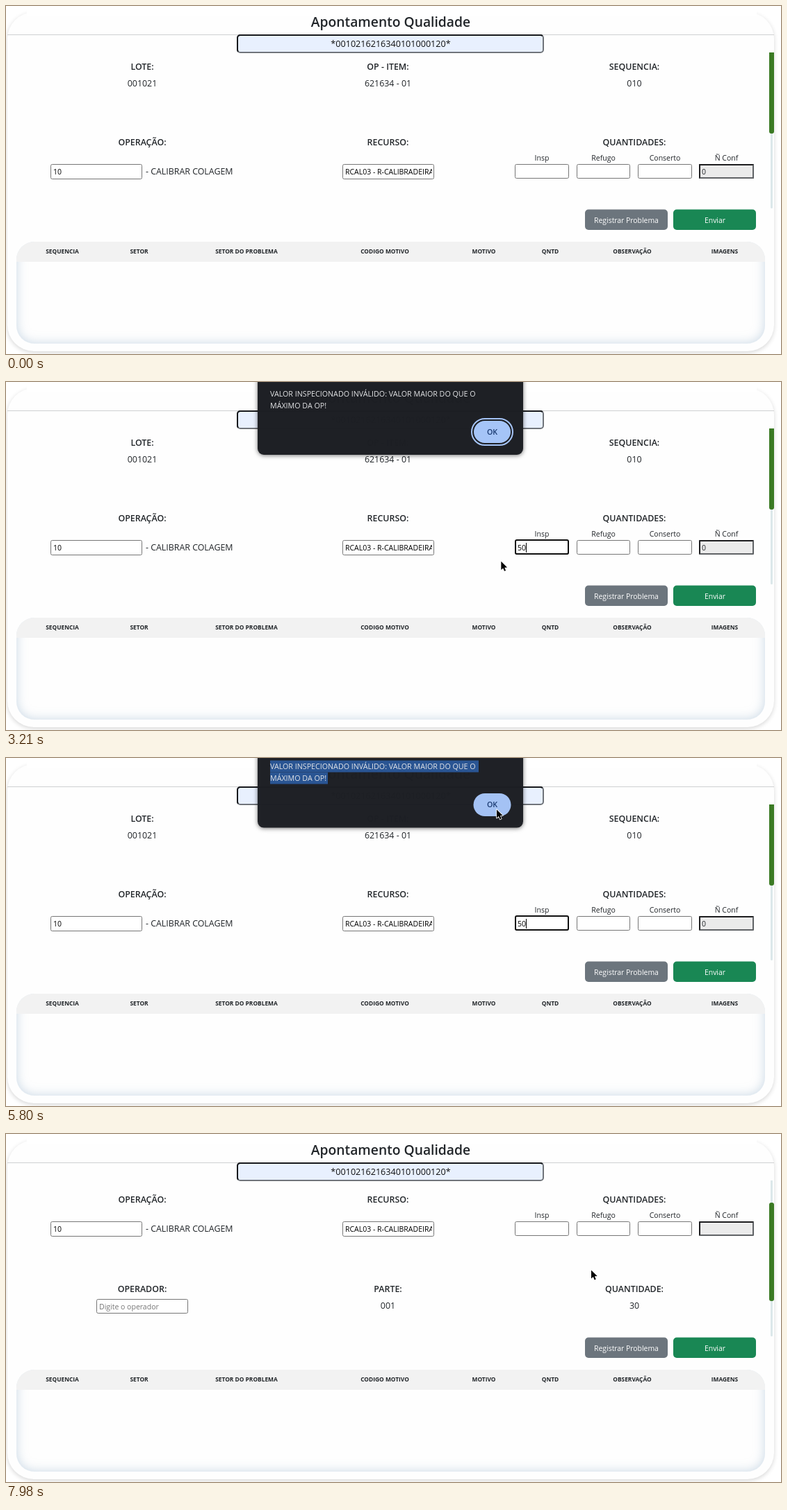
An HTML page with a canvas for the animation above (8000 ms loop, 1115 by 502 pixels).

```html
<!DOCTYPE html>
<html lang="pt-BR">
<head>
<meta charset="utf-8">
<title>Apontamento Qualidade</title>
<style>
  html, body { margin: 0; width: 100%; height: 100%; overflow: hidden; background: #fff; }
  canvas { display: block; }
</style>
</head>
<body>
<canvas id="stage" width="1115" height="502"></canvas>
<script>
const LOOP = 8000;
const ctx = document.getElementById('stage').getContext('2d');
const FAMILY = '"Open Sans", "Noto Sans", sans-serif';
const INK = '#212529';

// Times in ms followed by the values reached at that time.
const CURSOR = [
  [220, 490, 502], [750, 797, 240], [929, 797, 240], [930, 801, 241], [2750, 801, 241],
  [3370, 695, 263], [3550, 684, 241], [3800, 445, 60], [4050, 470, 34], [4260, 470, 34],
  [4650, 341, 14], [5170, 341, 14], [5720, 706, 75], [5950, 706, 75], [6260, 684, 181],
  [6770, 851, 190], [6800, 851, 190], [7210, 927, 164], [7390, 927, 164], [7620, 897, 172],
  [7850, 897, 172], [7970, 842, 197]
];
const SCROLL = [[5965, 0], [6260, 81], [6770, 170], [7850, 170], [7970, 102]];
const DIALOG_OPEN = 2760, DIALOG_CLOSE = 5785, DIALOG_TIME = 150;
const CLEARED = 5900;

const clamp = v => Math.max(0, Math.min(1, v));
const smooth = p => p * p * (3 - 2 * p);

function follow(keys, t, ease = p => p) {
  const next = keys.findIndex(k => k[0] > t);
  if (next === 0) return keys[0].slice(1);
  if (next < 0) return keys[keys.length - 1].slice(1);
  const a = keys[next - 1], b = keys[next];
  const p = ease((t - a[0]) / (b[0] - a[0]));
  return a.slice(1).map((v, i) => v + (b[i + 1] - v) * p);
}

// y is the middle of the capital letters.
function text(str, x, y, size, { weight = 400, color = INK, align = 'center' } = {}) {
  ctx.font = `${weight} ${size}px ${FAMILY}`;
  ctx.textAlign = align;
  ctx.fillStyle = color;
  ctx.fillText(str, x, y + size * 0.357);
}

function shape(x, y, w, h, radius, fill, stroke, line = 1) {
  ctx.beginPath();
  ctx.roundRect(x, y, w, h, radius);
  if (fill) { ctx.fillStyle = fill; ctx.fill(); }
  if (stroke) { ctx.strokeStyle = stroke; ctx.lineWidth = line; ctx.stroke(); }
}

function clipped(x, y, w, h, draw) {
  ctx.save();
  ctx.beginPath();
  ctx.rect(x, y, w, h);
  ctx.clip();
  draw();
  ctx.restore();
}

const heading = (str, x, y) => text(str, x, y, 12.4, { weight: 600 });
const value = (str, x, y, align) => text(str, x, y, 12.4, { align });

function pair(label, content, x, y) {
  heading(label, x, y);
  value(content, x, y + 24);
}

function field(x, y, w, h, content = '', color = '#000') {
  shape(x + 0.5, y + 0.5, w - 1, h - 1, 2, '#fff', '#767676');
  clipped(x + 3, y, w - 6, h, () =>
    text(content, x + 4, y + h / 2 + 0.5, 10.5, { color, align: 'left' }));
}

// Border with dark top and left sides, lighter bottom and right sides.
function bevel(x, y, w, h, radius, fill, dark, light) {
  shape(x + 1, y + 1, w - 2, h - 2, radius, fill, light, 2);
  ctx.save();
  ctx.beginPath();
  ctx.moveTo(x - 1, y + h + 1);
  ctx.lineTo(x + 3, y + h - 3);
  ctx.lineTo(x + w - 3, y + 3);
  ctx.lineTo(x + w + 1, y - 1);
  ctx.lineTo(x - 1, y - 1);
  ctx.clip();
  shape(x + 1, y + 1, w - 2, h - 2, radius, null, dark, 2);
  ctx.restore();
}

function drawCard() {
  ctx.fillStyle = '#fff';
  ctx.fillRect(0, 0, 1115, 502);
  ctx.save();
  ctx.shadowColor = 'rgba(0,0,0,.16)';
  ctx.shadowBlur = 6;
  ctx.shadowOffsetY = 2;
  shape(2, 9, 1103, 489, 38, '#fefefe');
  ctx.restore();
  ctx.fillStyle = '#fff';
  ctx.fillRect(30, 0, 1050, 14);
  ctx.fillStyle = '#cfd0d1';
  ctx.fillRect(2, 41, 1103, 1);
  text('Apontamento Qualidade', 553.5, 23, 19.3, { weight: 600 });
  bevel(332, 41, 442, 27, 4, '#e8f0fe', '#17191c', '#70747a');
  text('*0010216216340101000120*', 553.5, 55, 12.6, { color: '#111' });
}

function drawQuantities(t) {
  const typed = t < 1870 ? '' : t < 2100 ? '5' : t < CLEARED ? '50' : '';
  const focused = t >= 740 && t < CLEARED;
  const caret = focused && !(t >= 1270 && t < 1770) && !(t >= 2610 && t < 2760);
  heading('QUANTIDADES:', 904, 197);
  ['Insp', 'Refugo', 'Conserto', 'Ñ Conf'].forEach((name, i) =>
    text(name, 771 + i * 88.5, 219.5, 10.5));
  field(732, 228, 78, 21, typed);
  field(821, 228, 77, 21);
  field(909, 228, 78, 21);
  bevel(997, 228, 79, 21, 0, '#ebebeb', '#1d1d1f', '#606366');
  if (t < CLEARED) text('0', 1001, 239, 10.5, { align: 'left' });
  if (focused) shape(733, 228, 76, 20, 2, null, '#101010', 2);
  if (caret) {
    ctx.fillStyle = '#000';
    ctx.fillRect(736 + typed.length * 6, 232, 1, 14);
  }
}

function drawForm(t, scroll) {
  clipped(0, 67, 1098, 226, () => {
    ctx.translate(0, -Math.round(scroll));
    pair('LOTE:', '001021', 196, 88);
    pair('OP - ITEM:', '621634 - 01', 549.5, 88);
    pair('SEQUENCIA:', '010', 904, 88);

    heading('OPERAÇÃO:', 196, 197);
    field(64, 228, 132, 22, '10');
    value('- CALIBRAR COLAGEM', 201, 238.5, 'left');
    heading('RECURSO:', 549.5, 197);
    field(484, 228, 132, 22, 'RCAL03 - R-CALIBRADEIRA');
    drawQuantities(t);

    heading('OPERADOR:', 196, 326);
    field(130, 340, 132, 21, 'Digite o operador', '#757575');
    pair('PARTE:', '001', 549.5, 326);
    pair('QUANTIDADE:', '30', 904, 326);

    pair('CENTRO DE CUSTO:', '606 - FOLHEAMENTO DE COMPONENTE/MONTANTE', 196, 437);
    pair('PRODUTO:', 'CABECEIRA PINUS+HDF HDF CAR 628X125X36 SHAKER C/F', 549.5, 437);
    pair('CENTRO DE TRABALHO:', '0120 - CALIBRADEIRAS (PAF)', 904, 437);
  });
  clipped(1096, 67, 12, 226, () => {
    shape(1100, 42, 3, 250, 1.5, '#dce8ea');
    shape(1098, 42 + scroll * 0.56, 7, 142, 3, '#3b7a24');
  });
}

function drawTable() {
  shape(833, 293.5, 119, 29.5, 5, '#6c757d');
  text('Registrar Problema', 892.5, 309, 10.4, { color: '#fff' });
  shape(960, 293.5, 119, 29.5, 5, '#198754');
  text('Enviar', 1020, 309, 10.4, { color: '#fff' });

  ctx.save();
  ctx.beginPath();
  ctx.roundRect(15, 340, 1077, 147, 26);
  ctx.clip();
  ctx.fillStyle = '#fefefe';
  ctx.fillRect(15, 340, 1077, 147);
  // Inner glow cast by a frame that lies outside the clip.
  ctx.shadowColor = 'rgba(150,180,205,.5)';
  ctx.shadowBlur = 15;
  ctx.beginPath();
  ctx.rect(-40, 290, 1190, 250);
  ctx.roundRect(15, 340, 1077, 147, 26);
  ctx.fillStyle = '#e6edf3';
  ctx.fill('evenodd');
  ctx.shadowColor = 'transparent';
  ctx.fillStyle = '#f2f2f2';
  ctx.fillRect(15, 340, 1077, 29);
  ctx.restore();

  const columns = {
    'SEQUENCIA': 81, 'SETOR': 191.5, 'SETOR DO PROBLEMA': 346, 'CODIGO MOTIVO': 545,
    'MOTIVO': 687.5, 'QNTD': 783, 'OBSERVAÇÃO': 901, 'IMAGENS': 1034
  };
  for (const name in columns) text(name, columns[name], 354.5, 8.4, { weight: 700 });
}

function drawSelection(t, mouse) {
  if (t < 4260) return;
  const done = t >= 4650;
  const upper = done || mouse[1] < 26;
  const from = done ? 380 : Math.max(380, mouse[0]);
  ctx.fillStyle = '#2b5797';
  if (upper) ctx.fillRect(from, 8, 680 - from, 17);
  const lower = upper ? 380 : from;
  ctx.fillRect(lower, 25, Math.max(0, 463 - lower), 17);
}

function drawDialog(t, mouse) {
  if (t < DIALOG_OPEN || t > DIALOG_CLOSE + DIALOG_TIME) return;
  const opening = clamp((t - DIALOG_OPEN) / DIALOG_TIME);
  const closing = clamp((t - DIALOG_CLOSE) / DIALOG_TIME);
  const color = '#e6e7e9';
  ctx.save();
  ctx.globalAlpha = opening * (1 - closing * closing) * 0.985;
  ctx.translate(0, -50 * (1 - smooth(opening)) - 42 * closing);
  ctx.save();
  ctx.shadowColor = 'rgba(0,0,0,.55)';
  ctx.shadowBlur = 6;
  ctx.shadowOffsetY = 1;
  shape(362, -60, 382, 165, 9, '#1d1f24');
  ctx.restore();
  drawSelection(t, mouse);
  text('VALOR INSPECIONADO INVÁLIDO: VALOR MAIOR DO QUE O', 380, 17, 10.7, { color, align: 'left' });
  text('MÁXIMO DA OP!', 380, 34, 10.7, { color, align: 'left' });
  shape(672.5, 55.5, 54, 33, 16.5, '#a8c7fa');
  if (t < 4260) {
    shape(672, 55, 55, 34, 17, null, '#1d1f24', 2);
    shape(670, 53, 59, 38, 19, null, '#a8c7fa', 2);
  }
  text('OK', 699.5, 72, 10.7, { weight: 600, color: '#17376e' });
  ctx.restore();
}

function drawArrow(x, y) {
  ctx.beginPath();
  [[0, 0], [0, 12.2], [2.8, 9.7], [4.7, 14], [6.7, 13.1], [4.9, 8.9], [8.7, 8.6]]
    .forEach(([dx, dy]) => ctx.lineTo(x + dx, y + dy - 0.6));
  ctx.closePath();
  ctx.lineJoin = 'round';
  ctx.lineWidth = 1.6;
  ctx.strokeStyle = '#fff';
  ctx.stroke();
  ctx.fillStyle = '#000';
  ctx.fill();
}

function drawBeam(x, y, color) {
  x = Math.round(x);
  y = Math.round(y);
  ctx.fillStyle = color;
  ctx.fillRect(x, y - 7, 1, 15);
  ctx.fillRect(x - 4, y - 7, 9, 1);
  ctx.fillRect(x - 3, y + 8, 7, 1);
}

function drawCursor(t, [x, y]) {
  if (t < 220) return;
  const overField = x > 732 && x < 810 && y > 228 && y < 249;
  const overText = t > 3570 && t < DIALOG_CLOSE && x > 378 && x < 680 && y < 43;
  if (overField && t < CLEARED) drawBeam(x, y, '#222');
  else if (overText) drawBeam(x, y, '#fff');
  else drawArrow(x, y);
}

function render(t) {
  const mouse = follow(CURSOR, t, smooth);
  drawCard();
  drawForm(t, follow(SCROLL, t)[0]);
  drawTable();
  drawDialog(t, mouse);
  drawCursor(t, mouse);
}

const start = performance.now();
function tick() {
  render((performance.now() - start) % LOOP);
  requestAnimationFrame(tick);
}
tick();
</script>
</body>
</html>
```
